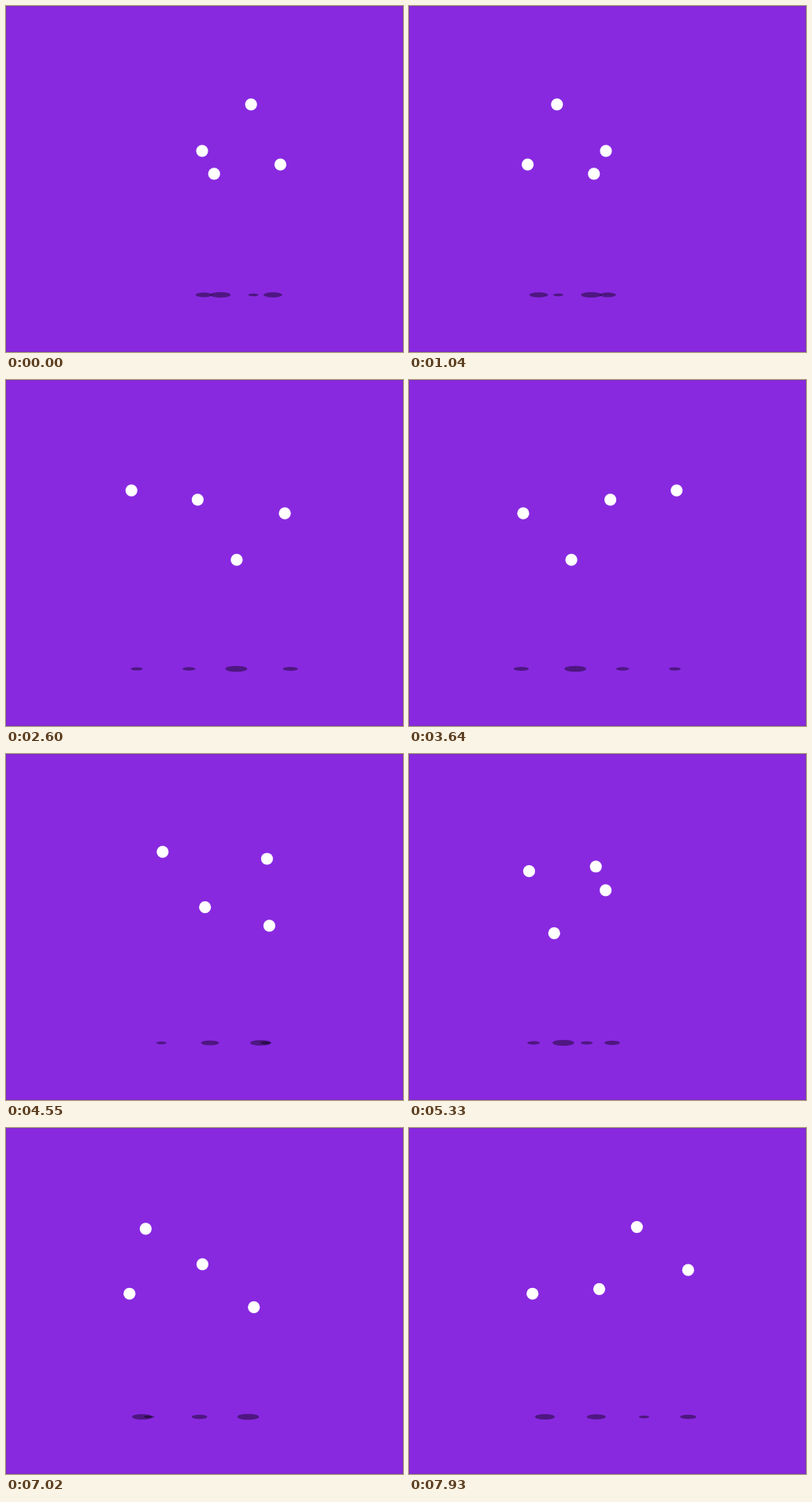
Write an HTML page with a canvas that moves like this. It is 504 px wide and 439 px high and loops after 8000 ms.

```html
<!DOCTYPE html>
<html lang="en">
<head>
<meta charset="utf-8">
<title>Juggling balls</title>
<style>
html, body { margin: 0; width: 100%; height: 100%; overflow: hidden; background: #8829e0; }
canvas { display: block; }
</style>
</head>
<body>
<canvas id="stage" width="504" height="439"></canvas>
<script>
const ctx = document.getElementById('stage').getContext('2d');
const LOOP = 8000, HOLD = 130;
const CENTER_X = 249.5, CENTER_Y = 176.5, RADIUS = 52.5;
const SHADOW_X = 251.75, SHADOW_Y = 366.5;
const mod = (a, n) => ((a % n) + n) % n;

function ellipse(x, y, rx, ry, color) {
  ctx.fillStyle = color;
  ctx.beginPath();
  ctx.ellipse(x, y, rx, ry, 0, 0, 2 * Math.PI);
  ctx.fill();
}

// Figure eight of two touching circles: 0-360 is the right one, 360-720 the left.
function ballAt(phase) {
  const side = mod(phase, 720) < 360 ? 1 : -1;
  const a = phase * Math.PI / 180;
  return {
    x: CENTER_X + side * RADIUS * (1 - Math.cos(a)),
    y: CENTER_Y - RADIUS * Math.sin(a)
  };
}

// The shadow sweeps from side to side, a little faster in the outer part.
function shadowX(phase) {
  const p = mod(phase + 7, 720), q = p % 360;
  const m = Math.min(q, 360 - q);
  const reach = 0.556 * m + 0.096 * Math.max(0, m - 78);
  return SHADOW_X + (p < 360 ? reach : -reach);
}

function draw(now) {
  const tick = Math.floor((now % LOOP) / HOLD);
  const step = Math.floor(3.744 * tick + 0.78);
  const phases = [0, 1, 2, 3].map(i => 316 + 12 * step - 108 * i);

  ctx.fillStyle = '#8829e0';
  ctx.fillRect(0, 0, 504, 439);
  ctx.strokeStyle = '#7b2cc4';
  ctx.strokeRect(0.5, 0.5, 503, 438);

  for (const phase of phases) {
    const rx = (12.8 + (ballAt(phase).y - 124) * 0.143) / 2;
    ellipse(shadowX(phase), SHADOW_Y, rx, rx * 0.27, 'rgba(0, 0, 0, 0.42)');
  }
  for (const phase of phases) {
    const { x, y } = ballAt(phase);
    ellipse(x, y, 7.6, 7.6, '#fff');
  }
}

const start = performance.now();
function loop() {
  draw(performance.now() - start);
  requestAnimationFrame(loop);
}
loop();
</script>
</body>
</html>
```
